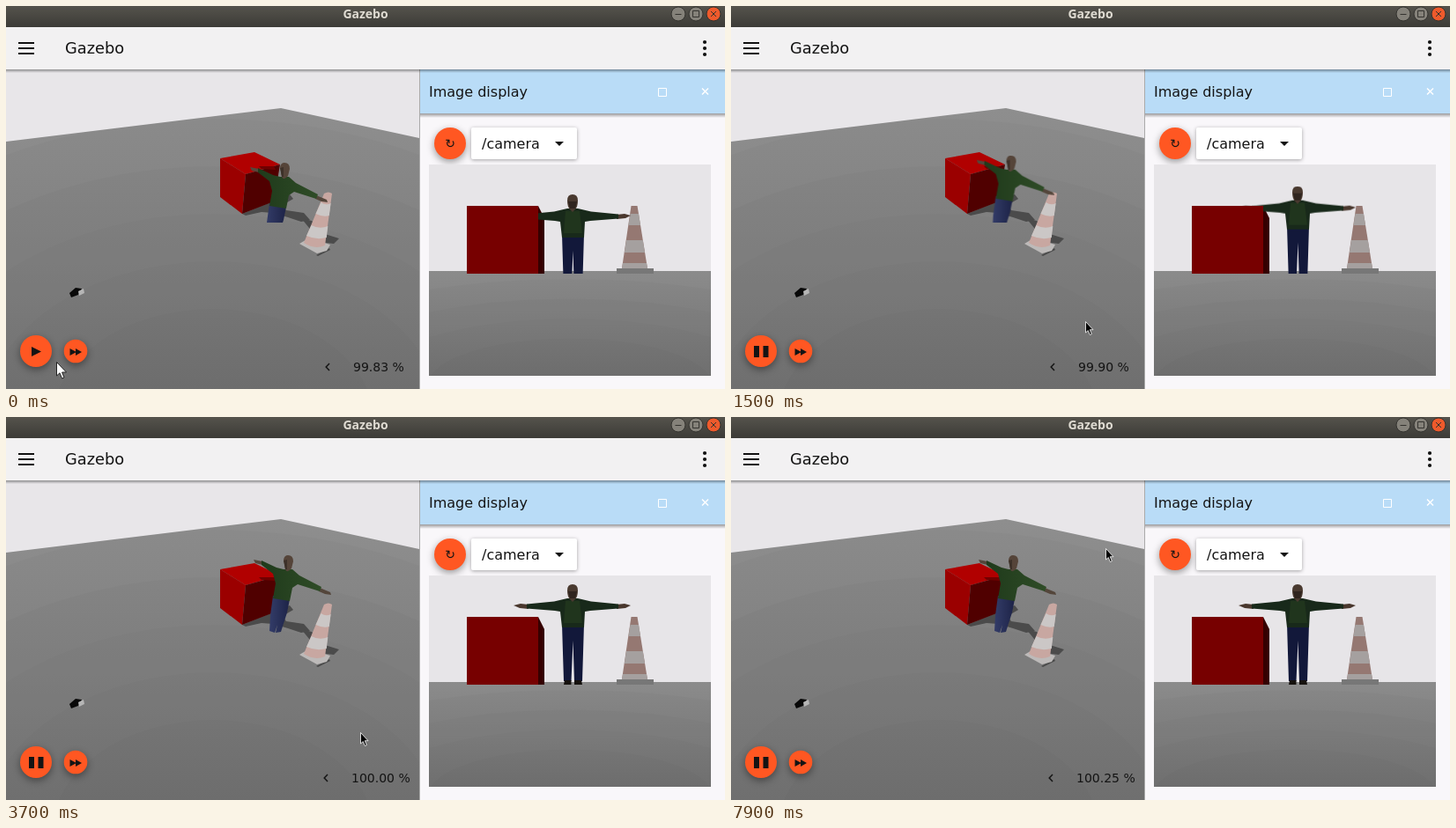
Animation, 816 px wide and 435 px high, one loop 8 s. Source, as an HTML page:

```html
<!DOCTYPE html>
<html lang="en">
<head>
<meta charset="utf-8">
<title>Gazebo</title>
<style>
html, body { margin: 0; width: 100%; height: 100%; overflow: hidden; background: #f9f7fa; }
svg { display: block; width: 816px; height: 435px; }
text { font-family: "DejaVu Sans", sans-serif; fill: #141414; }
.raised { filter: drop-shadow(0 1px 2px rgba(0,0,0,.35)); }
.lift { filter: drop-shadow(0 3px 4px rgba(0,0,0,.4)); }
.anim { animation: 8s linear infinite; }
#man { animation-name: rise; }
#camMan { animation-name: camRise; }
#popup { animation-name: popup; }
#cursor { animation-name: travel; }
#play, #lightArrow { animation-name: before; animation-timing-function: step-end; }
#pause, #darkArrow { animation-name: after; animation-timing-function: step-end; }
@keyframes rise {
  0%, 8.75% { transform: translate(-4px, 21px); }
  34.4%, 100% { transform: none; }
}
@keyframes camRise {
  0%, 8.75% { transform: translateY(24px); }
  34.4%, 100% { transform: none; }
}
@keyframes popup {
  0%, 8.75% { opacity: 0; }
  10%, 11.2% { opacity: .8; }
  12.5% { opacity: .25; }
  13.3%, 100% { opacity: 0; }
}
@keyframes travel {
  0%, 1.25% { transform: translate(57px, 404px); }
  3.75%, 6.9% { transform: translate(40px, 396px); }
  8.75% { transform: translate(80px, 392px); }
  12.5% { transform: translate(277px, 382px); animation-timing-function: ease-out; }
  18.75%, 68.75% { transform: translate(402px, 358px); animation-timing-function: ease-in-out; }
  73.75%, 100% { transform: translate(425px, 149px); }
}
@keyframes before { 0% { opacity: 1; } 6.25%, 100% { opacity: 0; } }
@keyframes after { 0% { opacity: 0; } 6.25%, 100% { opacity: 1; } }
</style>
</head>
<body>
<svg viewBox="0 0 816 435">
  <defs>
    <linearGradient id="bar" x2="0" y2="1"><stop stop-color="#55534c"/><stop offset="1" stop-color="#3c3b37"/></linearGradient>
    <linearGradient id="ground" x2="0" y2="1"><stop stop-color="#8e8e8e"/><stop offset=".55" stop-color="#838383"/><stop offset="1" stop-color="#777"/></linearGradient>
    <linearGradient id="floor" x2="0" y2="1"><stop stop-color="#8b8b8b"/><stop offset="1" stop-color="#757575"/></linearGradient>
    <linearGradient id="shade" x2="0" y2="1"><stop stop-color="#000" stop-opacity=".38"/><stop offset="1" stop-color="#000" stop-opacity="0"/></linearGradient>
    <linearGradient id="pants" x2="1" y2="0"><stop stop-color="#333c68"/><stop offset="1" stop-color="#1d2347"/></linearGradient>
    <linearGradient id="shirt" x2="1" y2="0"><stop stop-color="#1f3a1b"/><stop offset="1" stop-color="#2f4c27"/></linearGradient>
    <clipPath id="land"><path id="plane" d="M0 154 312 116 469 150V435H0Z"/></clipPath>
    <clipPath id="camLand"><path d="M480 301H800V420H480Z"/></clipPath>
    <clipPath id="soil"><path d="M240 72H469V245.500H240Z"/></clipPath>
    <clipPath id="camSoil"><path d="M480 180H800V304H480Z"/></clipPath>
  </defs>

  <!-- 3D scene -->
  <path fill="#e8e6e9" d="M0 72H470V435H0Z"/>
  <use href="#plane" fill="url(#ground)"/>
  <g id="rings" clip-path="url(#land)" fill="#000" fill-opacity=".018"></g>

  <g fill="#4b4b4b">
    <path d="M268 236 303 222 322 214 326 219 314 226 318 232 338 235 345 243 335 245 320 240 303 235 290 234 272 238Z"/>
    <path d="M335 241 347 244 362 259 378 264 372 270 356 268 344 252Z"/>
    <path d="M352 283 367 275 368 277 354 284Z"/>
  </g>

  <path fill="#b10000" d="M243 173 282 166 311 180 272 191Z"/>
  <path fill="#9b0000" d="M243 173 272 191 268 236 243 217Z"/>
  <path fill="#500000" d="M272 191 311 180 304 222 268 236Z"/>
  <path fill="#700000" d="M287 182 304 182 306 186 290 185Z"/>

  <path fill="#bdbab9" d="M333 270 343 264 368 271 364 278 353 281Z"/>
  <path fill="#c8a7a1" d="M361 213Q366 210 370 213L362 272Q350 277 338 269Z"/>
  <path fill="#cbc7c6" d="M357.500 223Q363 227 368.600 224L366.800 238Q360 240 351.500 236Z"/>
  <path fill="#cbc7c6" d="M346.500 249Q356 254 365.300 250L363.800 263Q352 266 341 261Z"/>

  <g clip-path="url(#soil)"><g id="man" class="anim">
    <path fill="url(#pants)" d="M303 203 322 207 319 222 312 244 306 245 308 236 305 245 299 243 300 225Z"/>
    <path fill="#54463b" d="M281 162 291 164 291 168 283 166ZM356 194 368 199 369 202 362 201 355 198Z"/>
    <path fill="url(#shirt)" d="M290 163 307 171 315 173 325 173 333 180 358 193 356 198 331 190 325 194 322 209 303 206 306 189 303 178 290 168Z"/>
    <path fill="#554439" d="M315 162Q316 157 320 157 326 157 326 164L324 172Q319 178 317 173Z"/>
    <path fill="#3d3129" d="M315 163 319 162 319 173 317 173Z"/>
  </g></g>

  <path fill="#080808" d="M72 326 79 320 86 321 82 328 74 331Z"/>
  <path fill="#b5b5b5" d="M82 324 88 321 89 326 83 329Z"/>

  <!-- step popup -->
  <g id="popup" class="anim">
    <path fill="#fff" d="M3 310H151V371H3Z"/>
    <path fill="#f4f4f4" stroke="#bbb" d="M71.500 323.500H137.500V359.500H71.500Z"/>
    <text x="18" y="346" font-size="14" fill-opacity=".8">Steps</text>
    <text x="109" y="346" font-size="14" fill-opacity=".8">1</text>
    <path fill="#555" d="M124 335 127 331 130 335ZM124 347 127 351 130 347Z"/>
  </g>

  <!-- playback controls -->
  <g fill="#ff5722" class="lift"><circle cx="34" cy="392" r="18"/><circle cx="79" cy="392" r="13.300"/></g>
  <g fill="#141414">
    <path id="play" class="anim" d="M29 387 40 392.500 29 398Z"/>
    <path id="pause" class="anim" d="M26 386H32V399H26ZM36.500 386H42.500V399H36.500Z"/>
    <path d="M72.500 389 79 392.500V389L86 393 79 397V393.500L72.500 397Z"/>
  </g>
  <path id="chevron" fill="none" stroke="#141414" stroke-width="1.500" d="M367 406 363.200 410 367 414"/>
  <text id="rate" y="415" font-size="14">99.83 %</text>

  <!-- image panel -->
  <path fill="#f9f7fa" d="M470 72H816V435H470Z"/>
  <path fill="#aaa" d="M469 72H470V435H469Z"/>
  <path fill="#b9dcf7" d="M470 72H816V122H470Z"/>
  <path fill="url(#shade)" d="M470 122H816V127H470Z"/>
  <text x="480" y="103" font-size="16">Image display</text>
  <path fill="none" stroke="#fff" d="M740.500 93.500H749.500V102.500H740.500Z"/>
  <path fill="none" stroke="#fff" stroke-width="1.500" d="M790 93.500 797 100.500M797 93.500 790 100.500"/>
  <circle class="lift" cx="504" cy="156" r="18" fill="#ff5722"/>
  <text x="504" y="161" font-size="14" text-anchor="middle">↻</text>
  <rect class="raised" x="528" y="138" width="120" height="36" rx="2" fill="#fff"/>
  <text x="540" y="162" font-size="16">/camera</text>
  <path fill="#141414" d="M623 154H633L628 159Z"/>

  <path fill="#e7e5e8" d="M480 180H800V301H480Z"/>
  <path fill="url(#floor)" d="M480 301H800V420H480Z"/>
  <g id="camRings" clip-path="url(#camLand)" fill="#000" fill-opacity=".018"></g>

  <path fill="#350000" d="M604 227 611 241V304H604Z"/>
  <path fill="#777" d="M693 298H735V304H693Z"/>
  <path fill="#957872" d="M709.500 227H716.500L728 298H699Z"/>
  <path fill="#a5a09f" d="M708.400 236H718L720 249H706.500ZM704 266H722.800L725 280H701.800ZM700 292H727L728 298H699Z"/>
  <g clip-path="url(#camSoil)"><g id="camMan" class="anim">
    <path fill="#12183a" d="M631 235H656L655 268 654 300H645L643.500 254 641.500 300H633L632 268Z"/>
    <path fill="#16120f" d="M634 299H641.500V304H633ZM645 299H653L654 304H645Z"/>
    <path fill="#49372d" d="M576 214 584 212 593 213V218L583 217ZM709 214 702 212 693 213V218L703 217Z"/>
    <path fill="#18291a" d="M591 212.500 622 209.500 637 206H649L664 209.500 695 212.500V217.500L663 220 657 221 656 239H631L629 221 623 220 591 217.500Z"/>
    <path fill="#20351d" d="M635 209H651L654 234H633Z"/>
    <path fill="#49392f" d="M637 197Q637 190 643 190T649 197Q649 204 646 207L643 210 640 207Q637 204 637 197Z"/>
    <path fill="#30251f" d="M638 198H648L646 206H640Z"/>
  </g></g>
  <path fill="#770000" d="M523 227H604V304H523Z"/>

  <!-- window chrome -->
  <path fill="#f2f1f2" d="M0 24H816V72H0Z"/>
  <path fill="url(#shade)" d="M0 72H816V76H0Z"/>
  <path fill="#111" d="M14 41H32V43H14ZM14 47H32V49H14ZM14 53H32V55H14Z"/>
  <text x="67" y="54" font-size="17.800">Gazebo</text>
  <g fill="#111"><circle cx="793" cy="41" r="2.100"/><circle cx="793" cy="48" r="2.100"/><circle cx="793" cy="55" r="2.100"/></g>
  <path fill="url(#bar)" d="M0 0H816V24H0Z"/>
  <text x="408" y="14" text-anchor="middle" style="font:bold 14px 'Noto Sans',sans-serif;fill:#dfdbd2">Gazebo</text>
  <g stroke="#34332f">
    <circle cx="763" cy="9" r="8" fill="#85827a"/><circle cx="783" cy="9" r="8" fill="#85827a"/><circle cx="803" cy="9" r="8" fill="#ee5a2c"/>
    <path fill="none" d="M759.500 9.500H766.500M779.500 5.500H786.500V12.500H779.500ZM800 6 806 12M806 6 800 12"/>
  </g>

  <g id="cursor" class="anim">
    <path id="lightArrow" class="anim" fill="#fff" stroke="#222" d="M.5.500V16L4 12.800 6.500 19 9 18 6.600 12H11.500Z"/>
    <path id="darkArrow" class="anim" fill="#000" stroke="#fff" stroke-width=".8" d="M.5.500V13L3.300 10.500 5.300 15.500 7.300 14.600 5.300 9.700H9Z"/>
  </g>
</svg>
<script>
const $ = id => document.getElementById(id);

// faint concentric light bands on the ground
function addRings(id, cx, cy, rx, ry, count) {
  for (let i = count; i > 0; i--) {
    const ring = document.createElementNS("http://www.w3.org/2000/svg", "ellipse");
    const k = .4 + .3 * i;
    Object.entries({ cx, cy, rx: rx * k, ry: ry * k })
      .forEach(([name, value]) => ring.setAttribute(name, value));
    $(id).append(ring);
  }
}
addRings("rings", 235, 470, 260, 180, 5);
addRings("camRings", 640, 430, 230, 75, 4);

// real-time factor: tick (100 ms) and percentage
const rates = [[0, 99.83], [10, 99.86], [21, 100.37], [29, 99.78], [47, 99.94], [61, 100.48], [79, 100.25], [80, 99.83]];

function rateAt(tick) {
  const i = rates.findIndex(([end]) => end > tick);
  const [t0, v0] = rates[i - 1], [t1, v1] = rates[i];
  const p = (tick - t0) / (t1 - t0);
  return v0 + (v1 - v0) * p + .2 * Math.sin(Math.PI * p) * Math.sin(tick * 2.4);
}

const start = performance.now();
let shown = -1;
function draw() {
  const tick = Math.floor((performance.now() - start) % 8000 / 100);
  if (tick !== shown) {
    shown = tick;
    const label = rateAt(tick).toFixed(2), wide = label.length > 5;
    $("rate").textContent = label + " %";
    $("rate").setAttribute("x", wide ? 392 : 394);
    $("chevron").setAttribute("transform", `translate(${wide ? -2 : 0})`);
  }
  requestAnimationFrame(draw);
}
draw();
</script>
</body>
</html>
```
